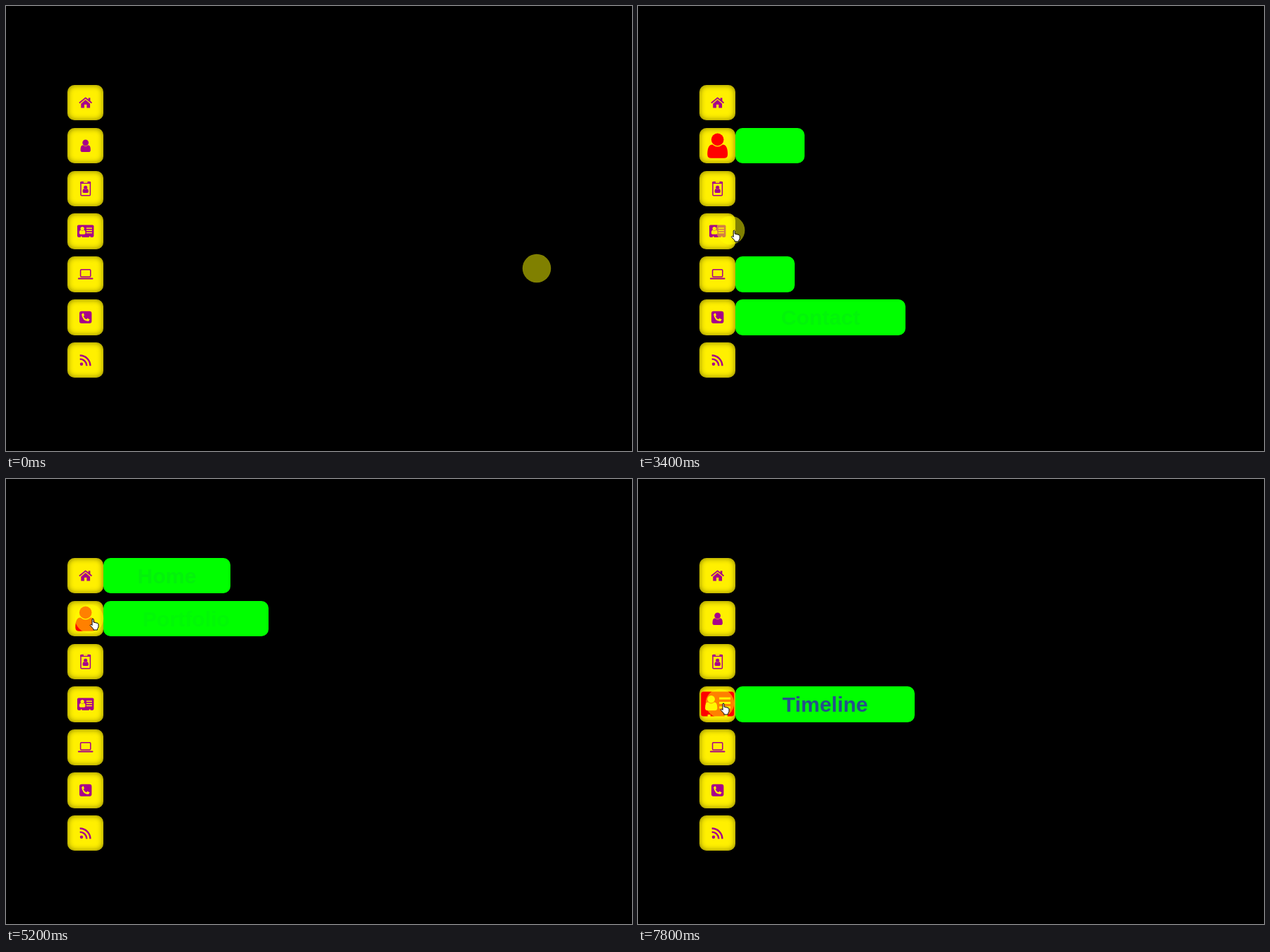
An HTML page for the animation above (8 s loop, 887 by 631 pixels).

```html
<!DOCTYPE html>
<html lang="en">
<head>
<meta charset="utf-8">
<title>Icon menu</title>
<style>
  html, body { margin: 0; width: 100%; height: 100%; overflow: hidden; background: #000; }
  .row { position: absolute; left: 87px; }
  .button, .bar { position: absolute; height: 50.4px; border-radius: 10px; }
  .button { width: 51.4px; background: #fff000; box-shadow: inset 0 0 8px rgba(0, 0, 0, .5); }
  .button svg { position: absolute; width: 51.4px; height: 50.4px; }
  .icon { fill: currentColor; stroke: currentColor; stroke-width: 0; }
  .icon .line { fill: none; stroke-width: 1.5; }
  .icon .cut { fill: #fff000; stroke: #fff000; }
  .bar { left: 51.4px; background: #0f0; overflow: hidden; }
  .bar span { position: absolute; left: 50%; transform: translateX(-50%); white-space: nowrap;
    font: bold 30px/51px "Liberation Sans", Arial, sans-serif; color: #2a3c9a; }
  #pointer { position: absolute; left: 0; top: 0; overflow: visible; }
  #pointer path { fill: #fff; stroke: #000; stroke-linejoin: round; }
</style>
</head>
<body>
<script>
const LOOP = 8000, STEP = 200, FULL = 260, TOP = 112, PITCH = 60.83;

const box = (x, y, w, h, r = 0, cls = '') =>
  `<rect class="${cls}" x="${x}" y="${y}" width="${w}" height="${h}" rx="${r}"/>`;
const person = (x, y, size, cls = '') =>
  `<g class="${cls}" transform="translate(${x} ${y}) scale(${size})"><circle cy="-4.4" r="4.4"/>
  <path d="M-3.6-.9Q0 2.2 3.6-.9 7.2-.9 7.2 6 7.2 8.8 4.5 8.8H-4.5Q-7.2 8.8-7.2 6-7.2-.9-3.6-.9"/></g>`;
const wave = r => `<path class="line" style="stroke-width:2.4" d="M-8 ${8 - r}a${r} ${r} 0 0 1 ${r} ${r}"/>`;

const rows = [
  ['Home', `<path class="line" style="stroke-width:1.8" d="M-8.8.3 0-6.8 8.8.3"/>
    <path d="M4-7H6.7V-1L4-3.4ZM-6.4 1.2 0-4.1 6.4 1.2V7.3H1.7V2.6H-1.7V7.3H-6.4Z"/>`],
  ['Portfolio', person(0, 0, 1)],
  ['About Me', box(-6.7, -9.6, 13.4, 19.2, 1.2, 'line') + box(-7.4, -10.3, 14.8, 3, 1) +
    box(-3, -10.4, 6, 2, 1, 'cut') + person(0, .6, .58)],
  ['Timeline', box(-11.7, -8.8, 23.4, 17.5, 1.8) + person(-4.5, -.8, .6, 'cut') +
    [-4.8, -1.6, 1.6].map(y => box(1.2, y, 8, 1.5, 0, 'cut')).join('') +
    [-7, 5].map(x => box(x, 7.4, 2, 2, 0, 'cut')).join('')],
  ['Projects', box(-7.1, -6.5, 14.2, 10.3, 1.2, 'line') + box(-10.8, 5.3, 21.6, 2, 1)],
  ['Contact', box(-8.7, -8.5, 17.4, 17.2, 3.2) +
    '<path class="cut" d="M-5.6-4 -3.2-6 -1.6-2.6 -3-1.2Q-1.8 1.7 1.2 3L2.7 1.6 6 3.2 4.2 5.7Q-4 6-5.6-4"/>'],
  ['Blog', '<circle cx="-5.7" cy="5.5" r="2.2"/>' + wave(9.6) + wave(14.7)]
];

// Row, time of entering, time of leaving
const visits = [
  [4, 2540, 2850], [5, 2850, 3320], [1, 3320, 3720], [0, 3630, 4810],
  [1, 4810, 6050], [2, 5920, 7100], [3, 7170, LOOP]
];

// Pointer stops: time, x, y
const stops = [
  [1800, 752, 372], [2000, 668.5, 372], [2800, 153, 422], [3200, 140, 440], [3700, 118, 135],
  [4600, 118, 135], [5200, 118, 198], [6200, 113.5, 275], [7300, 116, 318]
];

document.body.innerHTML += rows.map(([label, icon], i) =>
  `<div class="row" style="top:${TOP + i * PITCH}px">
    <div class="bar"><span>${label}</span></div>
    <div class="button"><svg viewBox="-25.7 -25.2 51.4 50.4"><g class="icon">${icon}</g></svg></div>
  </div>`).join('') +
  `<svg id="pointer" width="1" height="1"><g>
    <circle r="20.2" fill="#ff0" fill-opacity=".5"/>
    <path id="arrow" d="M.3.3V11.8L3 9.3 4.9 13.4 7 12.4 5.2 8.5H8.6Z"/>
    <path id="hand" d="M4 9.5V.8Q5-1 6 .8V5L12 6.5 13 8V12L11.5 14.5V16H5.8V14.5L1.5 9.5Q2-7 4 9.5" />
  </g></svg>`;

const all = selector => [...document.querySelectorAll(selector)];
const clamp = x => Math.min(1, Math.max(0, x));
const bars = all('.bar'), labels = all('.bar span'), icons = all('.icon');
const pointer = document.querySelector('#pointer g');
hand.setAttribute('d', 'M4 9.5V.8Q5-1 6 .8V5L12 6.5 13 8V12L11.5 14.5V16H5.8V14.5L1.2 9.5 2.5 8Z');

function pointerAt(t) {
  const k = stops.findIndex(s => s[0] > t);
  if (k < 1) return stops.at(k).slice(1);
  const [t0, x0, y0] = stops[k - 1], [t1, x1, y1] = stops[k], u = (t - t0) / (t1 - t0);
  return [x0 + (x1 - x0) * u, y0 + (y1 - y0) * u];
}

function rowState(row, t) {
  const visit = visits.findLast(v => v[0] === row && v[1] <= t);
  if (!visit) return { width: 0, ink: 0, hover: false };
  const [, enter, leave] = visit;
  const inside = Math.min(t, leave) - enter, away = Math.max(0, t - leave);
  return {
    width: FULL * (1 - Math.exp(-inside / 170)) * (1 - clamp(away / 700) ** 2),
    ink: clamp((inside - 380) / 280) * (away ? .2 * clamp(1 - away / 600) : 1),
    hover: !away
  };
}

function draw(now) {
  const t = Math.floor(now % LOOP / STEP) * STEP;
  rows.forEach((_, i) => {
    const { width, ink, hover } = rowState(i, t);
    bars[i].style.width = width + 'px';
    labels[i].style.opacity = ink;
    icons[i].style.color = hover ? '#f00' : '#a8008a';
    icons[i].setAttribute('transform', `scale(${hover ? 2 : 1})`);
  });
  pointer.setAttribute('transform', `translate(${pointerAt(t)})`);
  arrow.style.display = t >= 2000 && t < 2600 ? '' : 'none';
  hand.style.display = t >= 2600 ? '' : 'none';
}

const start = performance.now();
function tick() {
  draw(performance.now() - start);
  requestAnimationFrame(tick);
}
tick();
</script>
</body>
</html>
```
